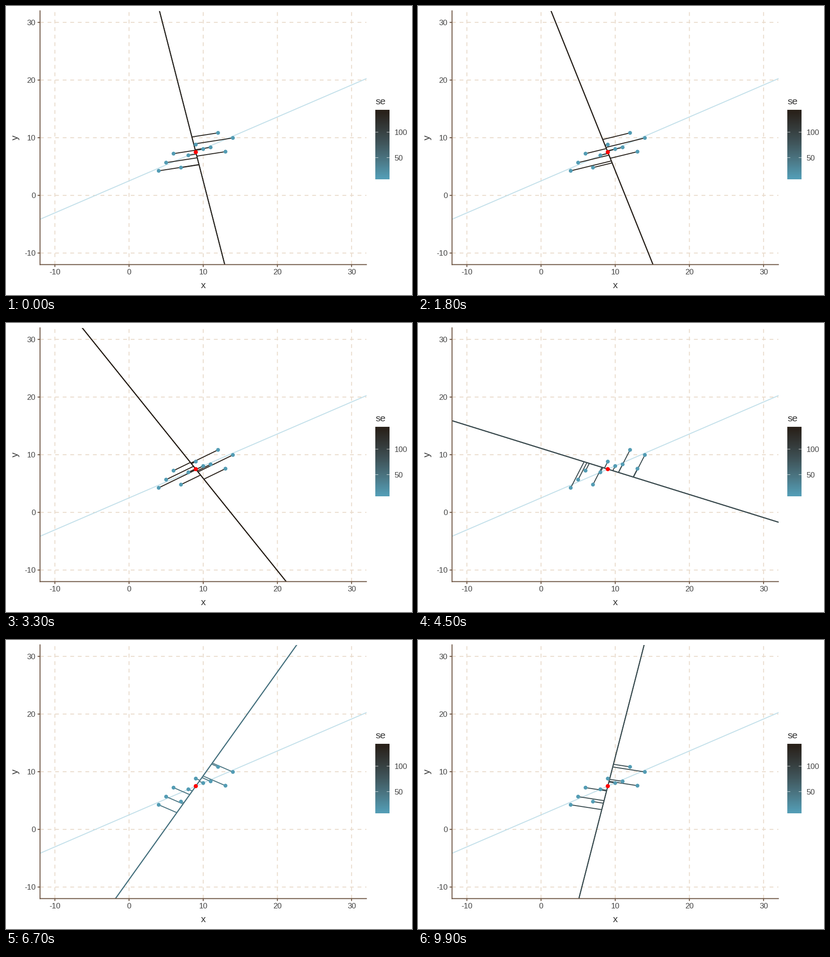
Write a matplotlib script that moves like this. It is 885 px wide and 632 px high and loops after 10 s.

```python
import numpy as np
import matplotlib.pyplot as plt
from matplotlib.animation import FuncAnimation
from matplotlib.collections import LineCollection
from matplotlib.colors import LinearSegmentedColormap
from matplotlib.patches import Circle

W, H, DPI = 885, 632, 100
PT = 72 / DPI  # points per pixel
LEFT, RIGHT, TOP, BOTTOM = 74.2, 785.6, 10.6, 565.5
LINE = 2.06 * PT
FRAMES = 100

BLUE, BROWN, GRID = "#539cb4", "#6f5745", "#eadccd"
INK, GREY = "#333333", "#444444"
cmap = LinearSegmentedColormap.from_list(
    "se", [BLUE, "#4c7987", "#41585e", "#353b3b", "#29211a"])

plt.rcParams["font.family"] = "Liberation Sans"
plt.rcParams["path.snap"] = False

x = np.array([10, 8, 13, 9, 11, 14, 6, 4, 12, 7, 5])
y = np.array([8.04, 6.95, 7.58, 8.81, 8.33, 9.96, 7.24, 4.26, 10.84, 4.82, 5.68])
mx, my = x.mean(), y.mean()
dx, dy = x - mx, y - my
slopes = np.linspace(-5, 5, 51)


def foot(b):
    """Closest points on the line of slope b through the mean."""
    t = (dx + b * dy) / (1 + b * b)
    return mx + t, my + b * t


def error(b):
    return np.sum((dy - b * dx) ** 2) / (1 + b * b)


errors = np.array([error(b) for b in slopes])
LO, HI = errors.min(), errors.max()


def far_line(b):
    return [(v, my + b * (v - mx)) for v in (-40, 60)]


def to_px(u, v):
    return (LEFT + (u + 12) / 44 * (RIGHT - LEFT),
            BOTTOM - (v + 12) / 44 * (BOTTOM - TOP))


fig = plt.figure(figsize=(W / DPI, H / DPI), dpi=DPI, facecolor="white")


def page_axes(z):
    a = fig.add_axes([0, 0, 1, 1], zorder=z)
    a.set(xlim=(0, W), ylim=(H, 0))
    a.axis("off")
    return a


page = page_axes(0)
ax = fig.add_axes([LEFT / W, 1 - BOTTOM / H, (RIGHT - LEFT) / W, (BOTTOM - TOP) / H],
                  zorder=1)
ax.set(xlim=(-12, 32), ylim=(-12, 32), xticks=[], yticks=[])
ax.patch.set_alpha(0)
ax.set_autoscale_on(False)
top = page_axes(2)


def label(px, py, text, size=17, color=GREY, ha="center", **kw):
    page.text(px, py, text, size=size * PT, color=color, ha=ha, va="baseline", **kw)


# Panel: grid, axis lines, ticks
for side in ("top", "right"):
    ax.spines[side].set_visible(False)
for side in ("left", "bottom"):
    ax.spines[side].set(color=BROWN, linewidth=LINE, zorder=10)
for v in range(-10, 31, 10):
    dash = dict(color=GRID, lw=LINE, ls=(0, (4, 4)), dash_capstyle="butt", zorder=1)
    ax.plot([-12, 32], [v, v], **dash)
    ax.plot([v, v], [-12, 32], **dash)
    px, py = to_px(v, v)
    tick = dict(color=BROWN, lw=LINE, solid_capstyle="butt")
    page.plot([px, px], [BOTTOM, BOTTOM + 5.3], **tick)
    page.plot([LEFT - 5.3, LEFT], [py, py], **tick)
    label(px, 587, str(v))
    label(64.5, py + 6, str(v), ha="right")
label(430, 617, "x", 21.2, INK)
label(26, 288, "y", 21.2, INK, rotation=90, rotation_mode="anchor")

# Colour bar
X0, X1, Y0, Y1 = 805.3, 836, 227, 379
pad = (Y1 - Y0) / 40
shade = np.clip(np.linspace(1 + 1 / 38, -1 / 38, 304), 0, 1)
page.imshow(shade[:, None], cmap=cmap, vmin=0, vmax=1, aspect="auto",
            extent=(X0, X1, Y1, Y0))
page.set(xlim=(0, W), ylim=(H, 0))
for v in (50, 100):
    py = Y1 - pad - (v - LO) / (HI - LO) * (Y1 - Y0 - 2 * pad)
    for a, b in ((X0, X0 + 6.1), (X1 - 6.1, X1)):
        page.plot([a, b], [py, py], color="white", lw=0.8 * PT, solid_capstyle="butt")
    label(846.5, py + 6, str(v), ha="left")
label(805, 215, "se", 21.2, INK, ha="left")

# Best fit, rotating line, residuals, points
sxx, syy, sxy = dx @ dx, dy @ dy, dx @ dy
best = (syy - sxx + np.hypot(syy - sxx, 2 * sxy)) / (2 * sxy)
ax.plot(*zip(*far_line(best)), color="#c3e0ea", lw=LINE, zorder=2)
lines = LineCollection([], linewidths=LINE, zorder=3)
links = LineCollection([], linewidths=LINE, zorder=4, capstyle="butt")
ax.add_collection(lines, autolim=False)
ax.add_collection(links, autolim=False)
for u, v in zip(x, y):
    top.add_patch(Circle(to_px(u, v), 4.2, color=BLUE, lw=0))
top.add_patch(Circle(to_px(mx, my), 4.5, color="red", lw=0))


def draw(i):
    # two frames per slope, with one short hold early on
    k = i // 2 if i <= 22 else (i + 1) // 2
    b = slopes[k]
    color = cmap((errors[k] - LO) / (HI - LO))
    # stacked copies give the crisp edge
    lines.set_segments([far_line(b)] * 3)
    fx, fy = foot(b)
    links.set_segments([[(p, q), (r, s)] for p, q, r, s in zip(x, y, fx, fy)])
    lines.set_color(color)
    links.set_color(color)
    return lines, links


anim = FuncAnimation(fig, draw, frames=FRAMES, interval=100, repeat=True,
                     repeat_delay=0, blit=False)
plt.show()
```
